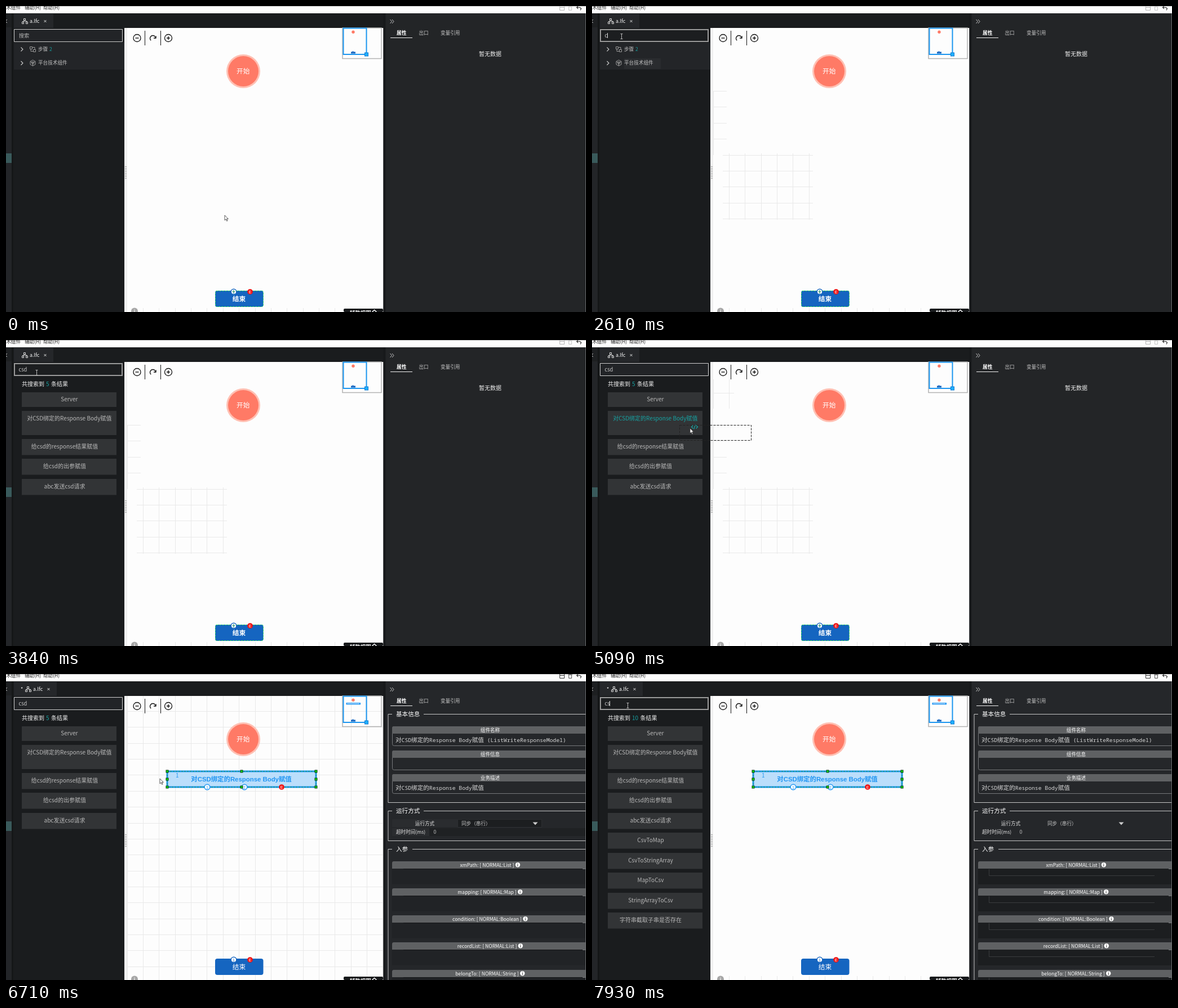
Recreate the animation shown at these times as an HTML page with a canvas. Size 1029x544 px, loop 8 s.

```html
<!DOCTYPE html>
<html lang="zh-CN">
<head>
<meta charset="utf-8">
<title>Flow editor</title>
<style>
html, body { margin: 0; width: 100%; height: 100%; overflow: hidden; background: #1a1c1e; }
canvas { display: block; }
</style>
</head>
<body>
<canvas id="stage" width="1029" height="544"></canvas>
<script>
const ctx = document.getElementById('stage').getContext('2d');
const LOOP = 8000, STEP = 28.35;
const SANS = '"Noto Sans CJK SC", "Noto Sans CJK", "Noto Sans", sans-serif';
const ARIAL = '"Liberation Sans", "Noto Sans CJK SC", sans-serif';
const MONO = '"Noto Sans Mono", "DejaVu Sans Mono", monospace';
const TEAL = '#16a3a3', BLUE = '#2196f3', NAVY = '#1565c0';
const NODE_NAME = '对CSD绑定的Response Body赋值';
const RESULTS = ['Server', NODE_NAME, '给csd的response结果赋值', '给csd的出参赋值', 'abc发送csd请求',
  'CsvToMap', 'CsvToStringArray', 'MapToCsv', 'StringArrayToCsv', '字符串截取子串是否存在'];
const PARAMS = ['xmPath: [ NORMAL:List ]', 'mapping: [ NORMAL:Map ]', 'condition: [ NORMAL:Boolean ]',
  'recordList: [ NORMAL:List ]', 'belongTo: [ NORMAL:String ]'];

// time, x, y, pointer shape
const POINTER = [
  [0, 388, 372, 'arrow'], [400, 234, 264, 'arrow'], [540, 216, 181, 'arrow'], [680, 116, 112, 'arrow'],
  [820, 66, 93, 'arrow'], [960, 58, 66, 'arrow'], [1100, 56, 56, 'beam'], [1240, 56, 55, 'beam'],
  [1510, 54, 54, 'beam'], [1630, 52, 54, 'beam'],
  [3720, 54, 58, 'beam'], [3854, 72, 80, 'arrow'], [3988, 105, 108, 'arrow'], [4122, 138, 130, 'arrow'],
  [4256, 160, 143, 'arrow'], [4390, 168, 149, 'arrow'],
  [4820, 169, 151, 'arrow'], [4960, 171, 154, 'arrow'], [5090, 174, 157, 'arrow'], [5220, 206, 163, 'arrow'],
  [5370, 250, 170, 'arrow'], [5520, 286, 176, 'arrow'], [5670, 302, 178, 'arrow'], [5820, 306, 178, 'arrow'],
  [6280, 290, 176, 'resize'], [6710, 273, 186, 'arrow'], [6860, 242, 168, 'arrow'], [7012, 186, 132, 'arrow'],
  [7164, 126, 93, 'arrow'], [7316, 84, 66, 'arrow'], [7468, 66, 57, 'beam'], [7620, 63, 56, 'beam']
];
const TYPED = [[0, ''], [2610, 'c'], [2740, 'cs'], [2890, 'csd'], [7930, 'cs']];
const CARET = [[1750, 2340], [2610, 3440], [3988, 4390], [7620, LOOP]];

const at = (list, t) => list.filter(k => k[0] <= t).pop();

function fill(x, y, w, h, color, r = 0) {
  ctx.fillStyle = color;
  ctx.beginPath();
  ctx.roundRect(x, y, w, h, r);
  ctx.fill();
}
function box(x, y, w, h, color, lw = 1, dash = [], r = 0) {
  ctx.strokeStyle = color;
  ctx.lineWidth = lw;
  ctx.setLineDash(dash);
  ctx.beginPath();
  ctx.roundRect(x, y, w, h, r);
  ctx.stroke();
  ctx.setLineDash([]);
}
function line(color, lw, ...pts) {
  ctx.strokeStyle = color;
  ctx.lineWidth = lw;
  ctx.beginPath();
  for (let i = 0; i < pts.length; i += 2) ctx.lineTo(pts[i], pts[i + 1]);
  ctx.stroke();
}
function disc(x, y, r, color, edge, lw = 1) {
  ctx.beginPath();
  ctx.arc(x, y, r, 0, 7);
  if (color) { ctx.fillStyle = color; ctx.fill(); }
  if (edge) { ctx.strokeStyle = edge; ctx.lineWidth = lw; ctx.stroke(); }
}
// y is the visual middle of the line
function text(s, x, y, size, color, { align = 'left', weight = 400, font = SANS } = {}) {
  ctx.font = `${weight} ${size}px ${font}`;
  ctx.textAlign = align;
  ctx.fillStyle = color;
  ctx.fillText(s, x, y + size * 0.38);
  return ctx.measureText(s).width;
}
function codeText(s, x, y, color) {
  for (const run of s.match(/[\u4e00-\u9fff]+|[^\u4e00-\u9fff]+/g)) {
    const cjk = run.charCodeAt(0) > 0x4e00;
    x += text(run, x, y, cjk ? 10.6 : 9.73, color, { font: cjk ? SANS : MONO });
  }
}

function grid(x, y, w, h) {
  ctx.save();
  ctx.beginPath();
  ctx.rect(x, y, w, h);
  ctx.clip();
  for (let k = 0; k < 18; k++) {
    const gx = Math.floor(215.2 + k * STEP) + 0.5, gy = Math.floor(38.2 + k * STEP) + 0.5;
    line('#e9e9e9', 1, gx, y, gx, y + h);
    line('#e9e9e9', 1, x, gy, x + w, gy);
  }
  ctx.restore();
}

function menuBar(dirty) {
  fill(0, 0, 1029, 13, '#fdfdfd');
  fill(0, 0, 1029, 1, '#b4b4b4');
  text('技术组件', 26, 3, 8.6, '#222', { align: 'right' });
  text('辅助(H)', 33, 3, 8.6, '#222');
  text('帮助(H)', 66, 3, 8.6, '#222');
  const save = dirty ? '#333' : '#b5b5b5', bin = dirty ? '#555' : '#c5c5c5';
  box(982.5, -1.5, 8, 9, save, 1);
  line(save, 1, 982, 2.5, 991, 2.5);
  box(998.5, 1.5, 5, 6, bin, 1);
  line(bin, 1, 997, 1, 1005, 1);
  line('#333', 1.2, 1015, 0, 1012.5, 2.5, 1015, 5);
  line('#333', 1.2, 1012.5, 2.5, 1018, 2.5, 1020.5, 4.5, 1019, 7.5);
}

function tab(dirty) {
  const dx = dirty ? 6 : 0;
  fill(14, 14, 70 + dx, 25, '#25272a');
  if (dirty) text('*', 26, 27, 9, '#fff');
  box(31.5 + dx, 22.5, 3, 3, '#ddd');
  box(28.5 + dx, 28.5, 3, 3, '#ddd');
  box(35.5 + dx, 28.5, 3, 3, '#ddd');
  line('#ddd', 1, 30 + dx, 28, 30 + dx, 27, 37 + dx, 27, 37 + dx, 28);
  text('a.lfc', 42 + dx, 27, 8.8, '#fff', { weight: 500 });
  line('#ddd', 1, 67.5 + dx, 25, 71.5 + dx, 29);
  line('#ddd', 1, 71.5 + dx, 25, 67.5 + dx, 29);
}

function tree(touched) {
  fill(14, 65, 196, 48, '#232528');
  if (touched) fill(57, 93, 65, 19, '#2a2c2f');
  for (const y of [77, 101.5]) line('#ccc', 1.1, 26.5, y - 3.5, 30, y, 26.5, y + 3.5);
  box(42.5, 72.5, 4, 4, '#999');
  box(48.5, 77.5, 4, 4, '#999');
  line('#999', 1, 47, 73.5, 51, 73.5, 51, 77);
  line('#999', 1, 44, 77, 44, 80.5, 48, 80.5);
  text('步骤', 57, 76.5, 8.6, '#c4c4c4');
  text('2', 77, 76.5, 8.6, TEAL);
  line('#999', 1, 47.5, 96, 52, 98.5, 52, 104, 47.5, 106.5, 43, 104, 43, 98.5, 47.5, 96);
  line('#999', 1, 43, 98.5, 47.5, 101, 52, 98.5);
  line('#999', 1, 47.5, 101, 47.5, 106.5);
  disc(47.5, 101, 2, null, '#999');
  text('平台技术组件', 57, 101, 8.6, '#c4c4c4');
}

function results(count, hover, shade) {
  let x = 28;
  const white = { weight: 500 };
  text('共搜索到', x, 78, 10, '#f2f2f2', white);
  x = 71 + text(count, 71, 78, 10, TEAL);
  text('条结果', x + 3.5, 78, 10, '#f2f2f2', white);
  RESULTS.slice(0, count).forEach((name, i) => {
    const top = i === 0 ? 93 : i === 1 ? 126 : 176 + (i - 2) * 35.45;
    fill(28, Math.round(top), 168, i === 0 ? 26 : i === 1 ? 43 : 28.5, shade);
    const lit = hover && i === 1;
    text(name, i < 2 ? 112.3 : 104, top + (i === 0 ? 12.5 : 13), 10, lit ? TEAL : '#b9b9b9', { align: 'center' });
    if (lit) {
      line(TEAL, 1.2, 179.5, 151.5, 176.5, 154.5, 179.5, 157.5);
      line(TEAL, 1.2, 184.5, 151.5, 187.5, 154.5, 184.5, 157.5);
      line(TEAL, 1.2, 183.3, 150.5, 180.8, 158.5);
    }
  });
}

function sidebar(t, dirty) {
  fill(0, 13, 1029, 531, '#1a1c1e');
  fill(0, 13, 10, 531, '#232528');
  fill(0, 13, 10, 25, '#1d1f21');
  line('#ccc', 1, 2, 24, -1, 27, 2, 30);
  fill(0, 262, 10, 17, '#395a5b');
  fill(10, 13, 3, 531, '#151718');
  tab(dirty);

  const focus = (t >= 1100 && t < 4820) || t >= 7468;
  const typed = at(TYPED, t)[1];
  fill(14, 41, 193, 23, focus ? '#1c1e20' : '#222427');
  if (focus) box(15, 42, 191, 21, '#9a9a9a', 2);
  else box(14.5, 41.5, 192, 22, '#cfcfcf');
  const w = text(typed, 22.5, 52.5, 9.3, '#c8c8c8');
  if (!typed) text('搜索', focus ? 22 : 22.7, 52.5, 9.3, '#b4b4b4');
  if (CARET.some(([a, b]) => t >= a && t < b)) fill(Math.round(22 + w), 48, 1, 9, '#e8e8e8');

  if (typed.length < 2) tree(t >= 820);
  else results(typed === 'cs' ? 10 : 5, t >= 4256 && t < 6280, t >= 6280 && t < 6710 ? '#26282b' : '#323436');
}

function port(x, y, label, color) {
  if (label === 'E') {
    disc(x, y, 4.8, '#f01010');
    text('E', x, y, 7, '#fff', { align: 'center', font: ARIAL });
  } else {
    disc(x, y, 4.8, '#fff', color, 1.4);
    text(label, x, y, 7, color, { align: 'center', font: ARIAL });
  }
}

function node() {
  fill(286, 173, 264, 28, '#bbdefb');
  box(286, 173, 264, 28, BLUE, 3);
  box(286, 173, 264, 28, '#12a04c', 1, [3, 2]);
  text('1', 301, 180.5, 10, BLUE);
  text(NODE_NAME, 417.5, 186.5, 11.4, BLUE, { align: 'center', weight: 700, font: ARIAL });
  port(357, 201, '1', BLUE);
  port(423, 201, '2', BLUE);
  port(489, 201, 'E');
  for (const x of [286, 418, 550]) for (const y of [173, 187, 201]) {
    if (x === 418 && y === 187) continue;
    fill(x - 2.5, y - 2.5, 5, 5, '#06330b');
    fill(x - 1.5, y - 1.5, 3, 3, '#12e612');
  }
}

function minimap(dirty) {
  box(597, 39, 69, 54.5, '#b2b2b2', 1.5);
  box(598.5, 39.5, 41, 46.5, '#1b95ef', 2);
  fill(636, 82.5, 7, 7, '#0b78d0');
  fill(637, 83.5, 5, 5, '#1fb1ff');
  disc(616, 46.3, 2.7, '#ff7a66');
  fill(612, 81.5, 8, 3, NAVY);
  fill(614, 80.5, 3, 1, NAVY);
  if (dirty) {
    fill(603.5, 51, 25.5, 3.5, BLUE);
    fill(605, 52, 22, 1.2, '#bbdefb');
  }
}

function board(t, dirty) {
  fill(210, 39, 459.5, 505, '#fdfdfd');
  fill(210, 39, 5, 505, '#f1f1f1');
  for (let y = 285; y < 307; y += 3) fill(211, y, 3, 1, '#999');
  if (dirty) {
    if (t >= 6710 && t < 6860) grid(215, 39, 454, 505);
  } else {
    if (t >= 400) grid(232, 262, 160, 118);
    if (t >= 540) grid(215, 151, 24, 114);
    if (t >= 4820) grid(215, 70, 37, 52);
  }
  grid(240, 537, 358, 7);

  disc(232.5, 57, 6.5, null, '#111', 1.3);
  line('#111', 1.4, 229.5, 57, 235.5, 57);
  disc(288, 57, 6.5, null, '#111', 1.3);
  line('#111', 1.4, 285, 57, 291, 57);
  line('#111', 1.4, 288, 54, 288, 60);
  line('#111', 1, 246.5, 44, 246.5, 70);
  line('#111', 1, 274.5, 44, 274.5, 70);
  ctx.beginPath();
  ctx.arc(260.5, 57.5, 5, 2.3, 6.1);
  ctx.lineWidth = 1.4;
  ctx.stroke();
  line('#111', 1.4, 266.3, 53.5, 265.8, 57.3, 262, 57);

  disc(421, 116, 30, '#ffc0b3');
  disc(421, 116, 27, '#ff7a66');
  text('开始', 420.7, 116, 11.7, '#fff', { align: 'center', weight: 500 });

  fill(371, 506, 85.5, 29, NAVY, 4);
  if (!dirty) box(371.5, 506.5, 85, 28, '#35e05b', 1, [3, 2], 2);
  text('结束', 413.5, 520.5, 11.7, '#fff', { align: 'center', weight: dirty ? 400 : 700 });
  port(404, 508, '1', NAVY);
  if (!dirty) {
    line('#3aa06a', 1, 401.5, 507.5, 406.5, 507.5);
    line('#3aa06a', 1, 404, 505, 404, 511);
  }
  port(433, 508, 'E');

  if (dirty) node();
  minimap(dirty);
  disc(228, 542.5, 6, '#a6a6a6');
  text('i', 228, 542.5, 8, '#fff', { align: 'center', weight: 700 });
  fill(599, 538, 70, 6, '#17191b', 2);
  text('辅助视图', 610, 545, 9.4, '#fff', { weight: 700 });
  line('#fff', 1.4, 649.5, 544, 653.5, 540.5, 657.5, 544);
}

function section(title, top, bottom, lineX) {
  const c = '#c6c6c6';
  line(c, 1, 685, top + 0.5, 678, top + 0.5, 678, bottom + 0.5, 1029, bottom + 0.5);
  line(c, 1, lineX, top + 0.5, 1029, top + 0.5);
  text(title, 692, top, 10.6, '#fff', { weight: 500 });
}

function properties(settled) {
  section('基本信息', 71, 228, 741);
  [['组件名称', `${NODE_NAME} (ListWriteResponseModel)`], ['组件信息', ''], ['业务描述', NODE_NAME]].forEach(([label, value], i) => {
    const y = 93 + Math.round(i * 42.5);
    box(685.5, y + 0.5, 350, 34, '#77797b', 1, [], 3);
    fill(685, y, 350, 13, '#5f6163', [3, 0, 0, 0]);
    text(label, 859, y + 6.5, 8.6, '#fff', { align: 'center', weight: 500 });
    if (value) codeText(value, 691, y + 24, '#d6d6d6');
  });

  section('运行方式', 243, 296, 741);
  if (!settled) {
    fill(685, 258, 116, 14, '#2a2c2f');
    fill(801, 258, 150, 14, '#1c1e20');
    box(801.5, 258.5, 149, 14, '#2d2f32');
    fill(685, 274, 66, 14, '#2a2c2f');
    fill(751, 274, 278, 14, '#1f2123');
  }
  text('运行方式', 743, 265.5, 8.6, '#e4e4e4', { align: 'center' });
  text('同步（串行）', 808, 265.5, 8.6, '#c8c8c8');
  ctx.fillStyle = '#ccc';
  ctx.beginPath();
  ctx.moveTo(934.5, 263.5);
  ctx.lineTo(943.5, 263.5);
  ctx.lineTo(939, 268.5);
  ctx.fill();
  text('超时时间(ms)', 692, 281, 8.6, '#e4e4e4');
  text('0', 758.5, 281, 8.6, '#c8c8c8');

  section('入参', 311, 560, 721);
  PARAMS.forEach((label, i) => {
    const y = Math.round(332.5 + i * 48.25);
    fill(685, y + 13, 344, 28, settled ? '#1c1e20' : '#212326');
    fill(685, y, 344, 13, '#5f6163', [3, 0, 0, 0]);
    if (settled) line('#3a3c3e', 1, 704.5, y + 14, 704.5, y + 25.5, 998, y + 25.5);
    else line('#141517', 1, 705, y + 13.5, 1023, y + 13.5);
    fill(1023, y + 13, 6, 1, '#77797b');
    ctx.font = `500 8.6px ${SANS}`;
    const w = ctx.measureText(label).width, x = 859 - (w + 11) / 2;
    text(label, x, y + 6.5, 8.6, '#fff', { weight: 500 });
    disc(x + w + 6.5, y + 6.3, 4.2, '#fff');
    text('i', x + w + 6.5, y + 6.3, 7, '#444', { align: 'center', weight: 700 });
  });
}

function panel(t, dirty) {
  fill(669.5, 13, 4, 531, '#17191b');
  fill(673.5, 13, 356, 531, dirty ? '#25272a' : '#232527');
  for (const x of [681.5, 685]) line('#ccc', 1, x, 24, x + 3, 27.5, x, 31);
  text('属性', 693, 47.5, 8.8, '#fff', { weight: 700 });
  text('出口', 732.5, 47.5, 8.6, '#c4c4c4');
  text('变量引用', 771, 47.5, 8.6, '#c4c4c4');
  fill(682, 56, 39, 1, '#f0f0f0');
  if (t < 6710) text('暂无数据', 859, 85.5, 10, '#f0f0f0', { align: 'center' });
  else properties(t >= 6860);
  fill(1028, 13, 1, 531, '#66686a');
}

function pointer(t) {
  const [, x, y, kind] = at(POINTER, t);
  if (t >= 4820 && t < 6280) box(x - 18.5, y - 5.5, 127, 27, '#222', 1, [4, 2]);
  if (kind === 'beam') {
    line('#b8b8b8', 1, x + 0.5, y - 4, x + 0.5, y + 4);
    line('#b8b8b8', 1, x - 1.5, y - 4.5, x + 2.5, y - 4.5);
    line('#b8b8b8', 1, x - 1.5, y + 4.5, x + 2.5, y + 4.5);
  } else if (kind === 'resize') {
    line('#444', 1, x - 3, y - 3, x + 3, y + 3);
    line('#444', 1, x - 3.5, y, x - 3.5, y - 3.5, x, y - 3.5);
    box(x + 0.5, y + 0.5, 3, 3, '#555');
  } else {
    const shape = new Path2D(`M${x} ${y}v9l2.1-2 1.6 3.4 1.4-.7-1.6-3.2h2.8z`);
    ctx.fillStyle = '#fff';
    ctx.fill(shape);
    ctx.strokeStyle = '#333';
    ctx.lineWidth = 0.8;
    ctx.stroke(shape);
  }
}

function frame(now) {
  const t = now % LOOP, dirty = t >= 6280;
  sidebar(t, dirty);
  board(t, dirty);
  panel(t, dirty);
  menuBar(dirty);
  pointer(t);
  requestAnimationFrame(() => frame(performance.now() - start));
}
const start = performance.now();
frame(0);
</script>
</body>
</html>
```
